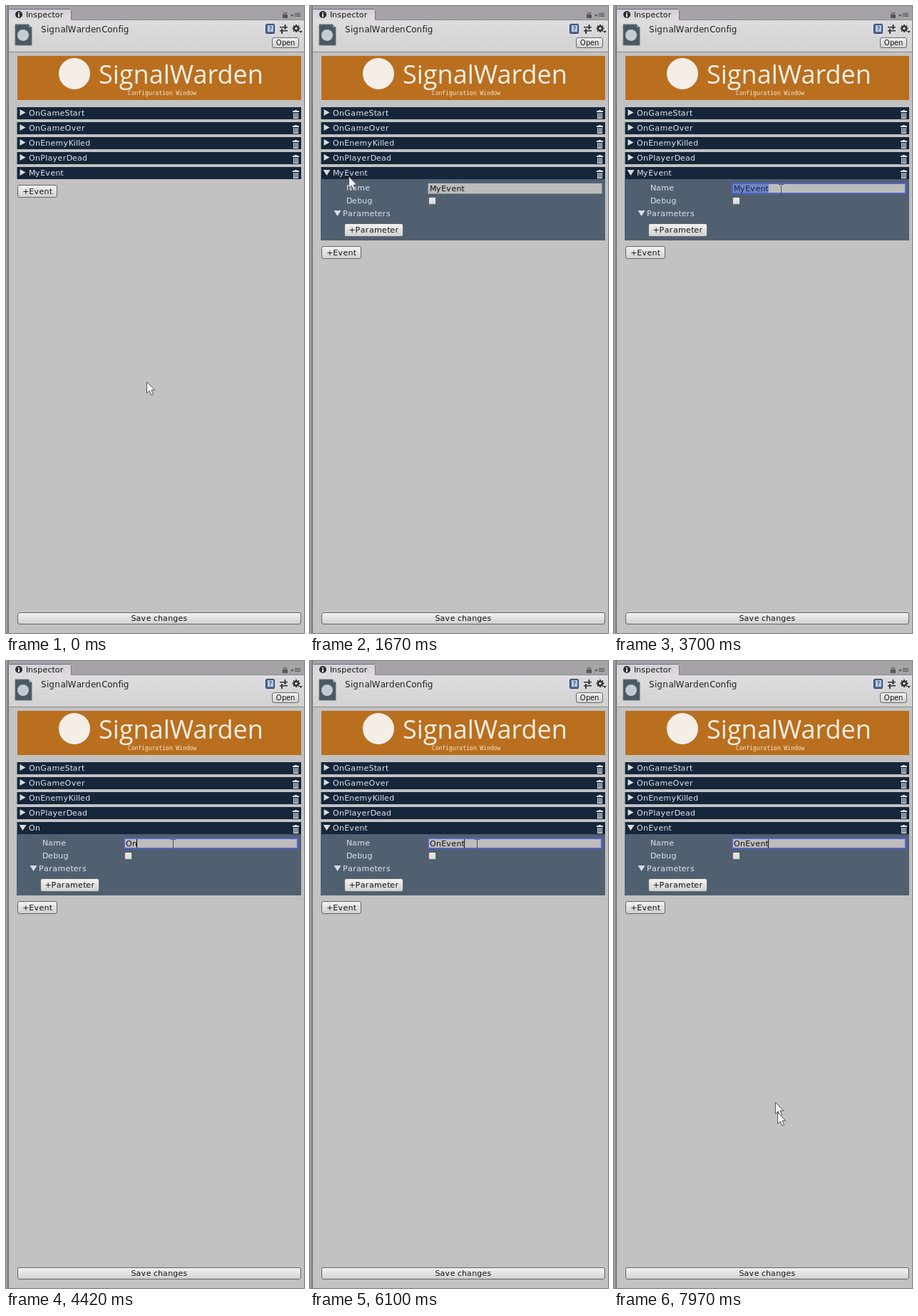
Animation, 418 px wide and 880 px high, one loop 8 s. Source, as an HTML page with a canvas:

```html
<!DOCTYPE html>
<html lang="en">
<head>
<meta charset="utf-8">
<title>Inspector</title>
<style>
html, body { margin: 0; width: 100%; height: 100%; overflow: hidden; background: #c2c2c2; }
canvas { display: block; width: 418px; height: 880px; }
</style>
</head>
<body>
<canvas id="stage" width="418" height="880"></canvas>
<script>
const ctx = document.getElementById('stage').getContext('2d');
const LOOP = 8000;
const OPEN_AT = 1200;
const FOCUS_AT = 2900;
const EXIT_AT = 7500;
const KEYS = [4190, 4340, 4820, 4960, 5090, 5240, 5380];
const LIGHT = '#e0e4e8';
const DARK = '#111';
const FIELD = { x: 165, y: 248, w: 245, h: 16 };

// Pointer stops: time, x, y
const PATH = [
  [0, 197, 527], [80, 197, 527], [820, 25, 236], [1480, 25, 236],
  [2300, 234, 257], [EXIT_AT, 234, 257]
];
const EXIT = [[EXIT_AT, 234, 257], [7780, 220, 520], [7940, 226, 618], [7970, 229, 633], [LOOP, 231, 642]];

function rect(x, y, w, h, fill) {
  ctx.fillStyle = fill;
  ctx.fillRect(x, y, w, h);
}

function circle(x, y, r, fill) {
  ctx.fillStyle = fill;
  ctx.beginPath();
  ctx.arc(x, y, r, 0, Math.PI * 2);
  ctx.fill();
}

function poly(points, fill, stroke) {
  ctx.beginPath();
  points.forEach(([x, y]) => ctx.lineTo(x, y));
  ctx.closePath();
  ctx.fillStyle = fill;
  ctx.fill();
  if (!stroke) return;
  ctx.strokeStyle = stroke;
  ctx.lineWidth = 1;
  ctx.stroke();
}

function text(str, x, y, fill, font, align = 'left') {
  ctx.font = font;
  ctx.textAlign = align;
  ctx.fillStyle = fill;
  ctx.fillText(str, x, y);
}

// Interface labels advance by whole pixels, slightly tracked
function labelFont(size) {
  return `${size}px "DejaVu Sans", sans-serif`;
}

function advance(ch) {
  return Math.round(ctx.measureText(ch).width) + 0.1;
}

function labelWidth(str, size = 11) {
  ctx.font = labelFont(size);
  return [...str].reduce((sum, ch) => sum + advance(ch), 0);
}

function label(str, x, y, fill = DARK, size = 11) {
  ctx.font = labelFont(size);
  ctx.textAlign = 'left';
  ctx.fillStyle = fill;
  for (const ch of str) {
    ctx.fillText(ch, x, y);
    x += advance(ch);
  }
}

function shade(y, h, top, bottom) {
  const g = ctx.createLinearGradient(0, y, 0, y + h);
  g.addColorStop(0, top);
  g.addColorStop(1, bottom);
  return g;
}

function box(x, y, w, h, r, fill, stroke) {
  ctx.beginPath();
  ctx.roundRect(x + 0.5, y + 0.5, w - 1, h - 1, r);
  ctx.fillStyle = fill;
  ctx.fill();
  ctx.strokeStyle = stroke;
  ctx.lineWidth = 1;
  ctx.stroke();
}

function button(x, y, w, h, caption, size = 11) {
  box(x, y, w, h, 2.5, shade(y, h, '#f4f4f4', '#cfcfcf'), '#666');
  label(caption, x + (w - labelWidth(caption, size)) / 2, Math.round(y + h / 2 + size * 0.36), DARK, size);
}

function foldout(x, y, open) {
  const points = open
    ? [[x - 0.5, y], [x + 9.5, y], [x + 4.5, y + 8]]
    : [[x + 0.5, y], [x + 8.5, y + 4.5], [x + 0.5, y + 9]];
  poly(points, '#d5dce3');
}

function trash(x, y) {
  rect(x + 3, y, 3, 1, LIGHT);
  rect(x, y + 1, 9, 2, LIGHT);
  rect(x + 1, y + 4, 7, 8, LIGHT);
  for (const dx of [2, 4, 6]) rect(x + dx, y + 4, 1, 7, '#26394d');
}

function headerIcons() {
  // Lock and tab menu
  rect(388, 12, 7, 5, '#555');
  ctx.strokeStyle = '#555';
  ctx.lineWidth = 1.2;
  ctx.beginPath();
  ctx.arc(391.5, 11.5, 2.2, Math.PI, 0);
  ctx.stroke();
  poly([[399, 12], [404, 12], [401.5, 15]], '#555');
  for (const y of [10, 12, 14]) rect(405, y, 8, 1, '#555');

  // Help book
  box(364, 25, 13, 14, 1.5, '#526d97', '#2d3f5c');
  rect(367, 27, 8, 9, '#b9cbe2');
  text('?', 371, 35, '#213a66', labelFont(9), 'center');

  // Sliders
  rect(384, 29, 11, 1.5, '#333');
  rect(384, 34, 11, 1.5, '#333');
  rect(390.5, 26, 2, 7, '#333');
  rect(386, 32, 2, 7, '#333');

  // Settings cog
  ctx.strokeStyle = '#333';
  ctx.lineWidth = 2;
  for (let i = 0; i < 8; i++) {
    const a = i * Math.PI / 4;
    ctx.beginPath();
    ctx.moveTo(407 + 2.5 * Math.cos(a), 31.5 + 2.5 * Math.sin(a));
    ctx.lineTo(407 + 5.5 * Math.cos(a), 31.5 + 5.5 * Math.sin(a));
    ctx.stroke();
  }
  circle(407, 31.5, 4, '#333');
  circle(407, 31.5, 1.7, '#ddd');
  poly([[411, 35], [416, 35], [413.5, 38]], '#333');
}

function header() {
  rect(0, 0, 418, 20, '#a5a3a6');
  rect(4, 19, 414, 46, shade(19, 46, '#dedcde', '#d3d2d3'));
  rect(4, 19, 414, 1, '#8d8a90');
  rect(4, 64, 414, 1, '#898989');

  ctx.beginPath();
  ctx.roundRect(4, 4, 87, 17, [3, 3, 0, 0]);
  ctx.fillStyle = shade(4, 17, '#d3d0d6', '#dedcde');
  ctx.fill();
  rect(5, 4, 85, 1, '#6c6795');
  rect(91, 6, 1, 13, '#77747b');
  circle(18, 12, 5, '#2d2d31');
  rect(17, 9, 2, 1.5, '#eee');
  rect(17, 11.5, 2, 4, '#eee');
  label('Inspector', 28, 16);

  poly([[13, 26], [32, 26], [36, 30], [36, 55], [13, 55]], '#4b5964', '#65717a');
  poly([[32, 26], [32, 30], [36, 30]], '#97a3ab');
  circle(24, 41, 8, '#c3ccd2');
  label('SignalWardenConfig', 49, 37, '#222', 12);
  headerIcons();
  button(373, 44, 38, 15, 'Open', 10);
}

function banner() {
  rect(16, 70, 398, 62, '#b96f1e');
  circle(96, 95, 22, '#f4eee7');
  text('SignalWarden', 130, 109, '#f4eee7', '36px "Open Sans", sans-serif');
  text('Configuration Window', 219, 125, '#f6e8d8', '8px "DejaVu Sans Mono", monospace', 'center');
}

function eventRow(y, name, open) {
  rect(15.5, y, 398.5, 17, '#15263a');
  foldout(19, y + (open ? 4 : 3), open);
  label(name, 32, y + 12, LIGHT);
  trash(402, y + 4);
}

function nameField(value, focused, selected) {
  const { x, y, w, h } = FIELD;
  rect(x, y, w, h, '#bcbcbc');
  ctx.strokeStyle = focused ? '#5266c4' : '#858a90';
  ctx.lineWidth = focused ? 2 : 1;
  const inset = ctx.lineWidth / 2;
  ctx.strokeRect(x + inset, y + inset, w - inset * 2, h - inset * 2);
  if (!focused) rect(x, y, w, 1, '#62676e');
  const width = labelWidth(value);
  if (selected) rect(x + 2, y + 2, width + 1, h - 4, '#7086c6');
  label(value, 168, 260, selected ? '#14204a' : DARK);
  if (focused && !selected) rect(Math.round(168 + width) - 1, y + 2, 1, h - 4, DARK);
}

function eventPanel(value, focused, selected) {
  rect(15, 243, 399, 86, '#506071');
  label('Name', 51, 259, LIGHT);
  nameField(value, focused, selected);
  label('Debug', 51, 277, LIGHT);
  box(166, 268, 11, 11, 1.5, shade(268, 11, '#eee', '#d4d4d4'), '#6a6a6a');
  foldout(34, 287, true);
  label('Parameters', 46, 295, LIGHT);
  button(48, 305, 83, 19, '+Parameter');
}

function pointerAt(t) {
  const leaving = t >= EXIT_AT;
  const stops = leaving ? EXIT : PATH;
  let i = 1;
  while (i < stops.length - 1 && t > stops[i][0]) i++;
  const [t0, x0, y0] = stops[i - 1];
  const [t1, x1, y1] = stops[i];
  let k = Math.min(1, Math.max(0, (t - t0) / (t1 - t0)));
  if (!leaving) k = k * k * (3 - 2 * k);
  return [Math.round(x0 + (x1 - x0) * k), Math.round(y0 + (y1 - y0) * k)];
}

function arrow(x, y) {
  const shape = [[0, 0], [0, 16], [3.7, 12.6], [6.5, 19], [9.2, 17.8], [6.5, 11.6], [11.3, 11.6]];
  poly(shape.map(([dx, dy]) => [x + 0.5 + dx, y + 0.5 + dy]), '#f2f2f2', '#555');
}

function textBeam(x, y) {
  const ink = '#555';
  rect(x, y - 6, 1, 14, ink);
  for (const dy of [-7, 8]) {
    rect(x - 3, y + dy, 3, 1, ink);
    rect(x + 1, y + dy, 3, 1, ink);
  }
}

function pointer(t, open) {
  const [x, y] = pointerAt(t);
  const { x: fx, y: fy, w, h } = FIELD;
  const inField = open && x >= fx && x <= fx + w && y >= fy && y <= fy + h;
  if (inField) return textBeam(x, y);
  // The fast exit leaves a trailing copy
  if (t > EXIT_AT + 60) arrow(...pointerAt(t - 30));
  arrow(x, y);
}

function draw(t) {
  const open = t >= OPEN_AT;
  const focused = t >= FOCUS_AT;
  const typed = KEYS.filter(k => t >= k).length;
  const value = typed ? 'OnEvent'.slice(0, typed) : 'MyEvent';

  rect(0, 0, 418, 880, '#c2c2c2');
  header();
  rect(0, 0, 3, 880, '#a2a2a4');
  rect(2, 0, 2, 880, '#77777b');
  banner();
  ['OnGameStart', 'OnGameOver', 'OnEnemyKilled', 'OnPlayerDead', value]
    .forEach((name, i) => eventRow(142 + i * 21, name, open && i === 4));
  if (open) eventPanel(value, focused, focused && !typed);
  button(16, open ? 337 : 251, 56, 18, '+Event');
  button(16, 851, 398, 17, 'Save changes');
  pointer(t, open);
}

const start = performance.now();
function frame() {
  draw((performance.now() - start) % LOOP);
  requestAnimationFrame(frame);
}
frame();
</script>
</body>
</html>
```
